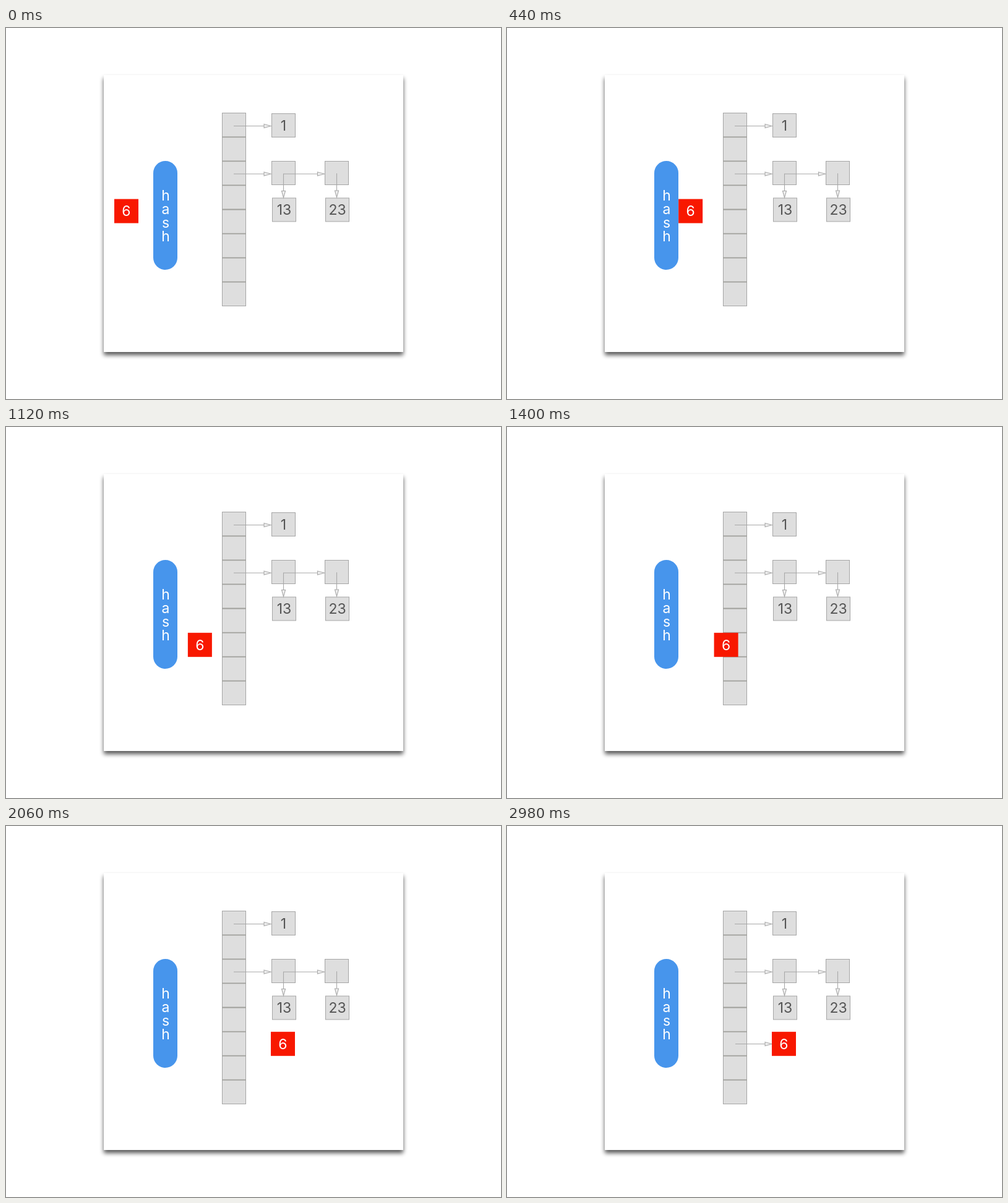
An HTML page for the animation above (4600 ms loop, 800 px wide and 600 px high).

```html
<!DOCTYPE html>
<html lang="en">
<head>
<meta charset="utf-8">
<title>Hash table insert</title>
<style>
  html, body { margin: 0; width: 100%; height: 100%; overflow: hidden; background: #fff; }
  svg { display: block; width: 100vw; height: 100vh; }
  text { font: 400 23px Inter, "Liberation Sans", sans-serif; text-anchor: middle; }
  .cell { fill: #dedede; stroke: #a5a5a5; }
  .rule { stroke: #a0a09c; stroke-width: 1.8; }
  .num { fill: #555; }
  .light { fill: #fff; }
  .arrow { fill: none; stroke: #a8a8a8; stroke-width: 1.1; }
  .head { fill: #f0f0f0; }
</style>
</head>
<body>
<svg viewBox="0 0 800 600">
  <defs>
    <filter id="blur" x="-10%" y="-10%" width="120%" height="120%">
      <feGaussianBlur stdDeviation="3.8"/>
    </filter>
  </defs>
  <rect x="158" y="81" width="484" height="448" fill="#000" opacity=".66" filter="url(#blur)"/>
  <rect x="158" y="76" width="484" height="448" fill="#fff"/>
  <rect x="238" y="215" width="39" height="176" rx="19.5" fill="#4795ec"/>
  <g id="scene"></g>
  <g id="link"></g>
  <g id="key">
    <rect width="39" height="39" fill="#f81800"/>
    <text class="light" x="19.5" y="27.8">6</text>
  </g>
</svg>
<script>
const LOOP = 4600;
const NS = "http://www.w3.org/2000/svg";
const byId = id => document.getElementById(id);
const scene = byId("scene"), link = byId("link"), key = byId("key");

function add(parent, tag, attrs, label) {
  const el = document.createElementNS(NS, tag);
  for (const name in attrs) el.setAttribute(name, attrs[name]);
  if (label) el.textContent = label;
  parent.appendChild(el);
}

function box(x, y, label) {
  add(scene, "rect", { class: "cell", x, y, width: 38, height: 38 });
  if (label) add(scene, "text", { class: "num", x: x + 19, y: y + 27.3 }, label);
}

// Straight arrow with a slim outlined head, pointing right or down
function arrow(parent, x, y, length, down) {
  const g = { class: "arrow", transform: `translate(${x} ${y}) rotate(${down ? 90 : 0})` };
  add(parent, "path", { ...g, d: `M0 0H${length - 11}` });
  add(parent, "path", { ...g, class: "arrow head", d: `M${length - 11} -3L${length} 0L${length - 11} 3Z` });
}

[..."hash"].forEach((c, i) => add(scene, "text", { class: "light", x: 258, y: 279 + 22 * i }, c));

add(scene, "rect", { class: "cell", x: 349.5, y: 137.5, width: 38, height: 312 });
for (let i = 1; i < 8; i++) {
  const y = 137.3 + 39.05 * i;
  add(scene, "path", { class: "rule", d: `M349 ${y}H388` });
}

box(429.5, 138.5, "1");
box(429.5, 215.5);
box(515.5, 215.5);
box(430.5, 275, "13");
box(516.5, 275, "23");
arrow(scene, 368, 158.5, 60);
arrow(scene, 368, 236, 60);
arrow(scene, 448.5, 236, 66);
arrow(scene, 448.5, 235.5, 39, true);
arrow(scene, 534.5, 235, 39, true);
arrow(link, 369, 352.5, 59);

const span = (t, from, to) => Math.min(1, Math.max(0, (t - from) / (to - from)));
// Cosine ease; a skew below 1 brings the fastest part forward
const ease = (u, skew = 1) => (1 - Math.cos(Math.PI * u ** skew)) / 2;

function draw(t) {
  const x = 175 + 118 * ease(span(t, 20, 620), 0.77) + 135 * ease(span(t, 1090, 2060), 0.863);
  const y = 276.6 + 56.2 * ease(span(t, 722, 1110));
  key.setAttribute("transform", `translate(${x.toFixed(2)} ${y.toFixed(2)})`);
  link.setAttribute("opacity", span(t, 2110, 2760).toFixed(3));
}

const start = performance.now();
function tick() {
  draw((performance.now() - start) % LOOP);
  requestAnimationFrame(tick);
}
tick();
</script>
</body>
</html>
```
